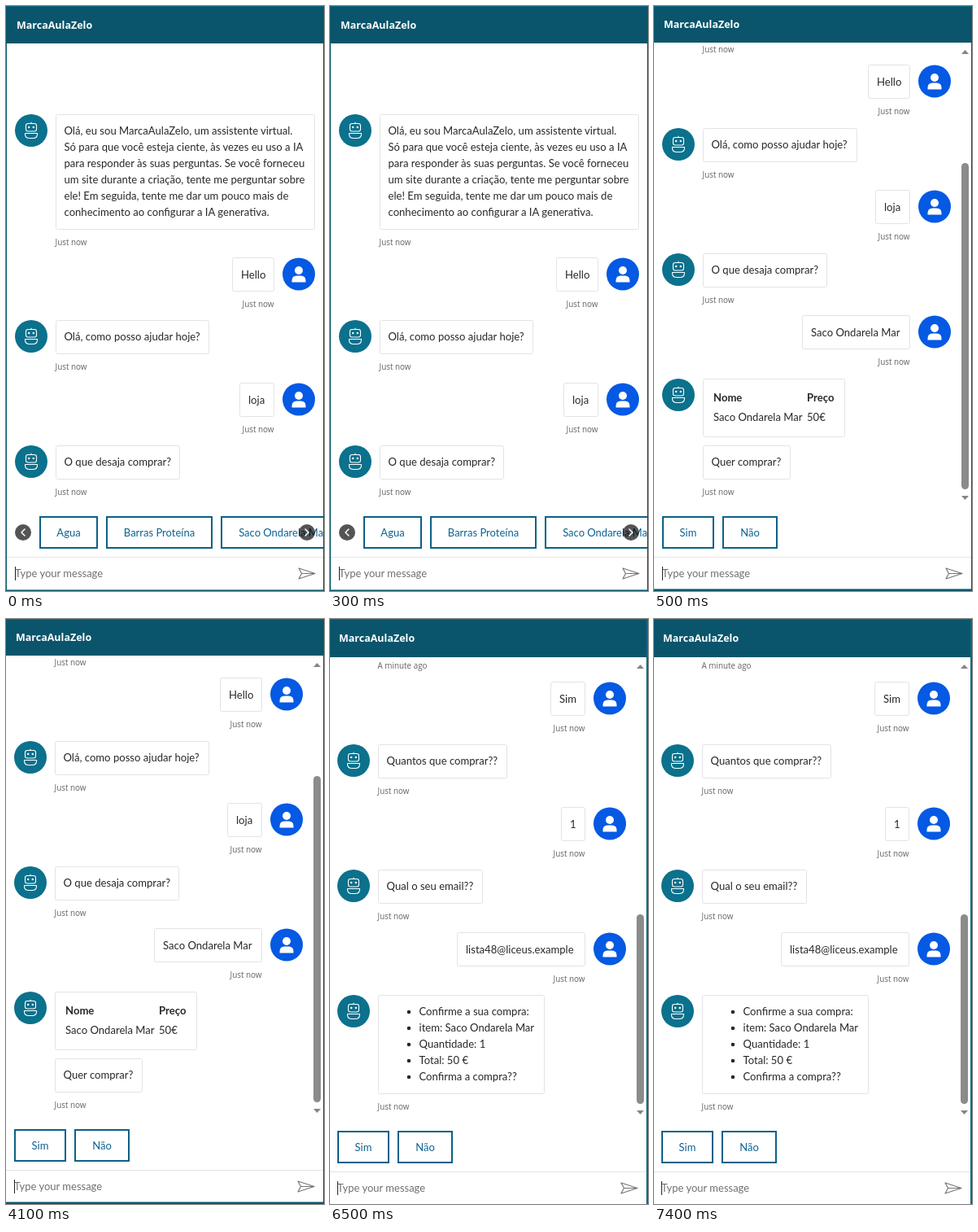
These frames come from a looping animation (391 px wide and 719 px high, 8000 ms). An HTML page:

```html
<!DOCTYPE html>
<html lang="pt">
<head>
<meta charset="utf-8">
<title>Chat</title>
<style>
  html, body { margin: 0; width: 100%; height: 100%; overflow: hidden; background: #fff; }
  svg { display: block; width: 391px; height: 719px; }
  text { font: 13.1px Lato, sans-serif; fill: #282828; white-space: pre; }
  .title { font: 700 12.5px "Open Sans", sans-serif; fill: #fff; }
  .time { font: 9.9px "Open Sans", sans-serif; fill: #636363; }
  .bold { font-weight: 700; }
  .chip { font-size: 13px; fill: #0b6191; text-anchor: middle; }
  .hint { font-size: 13px; fill: #707070; }
  .end { text-anchor: end; }
</style>
</head>
<body>
<svg id="stage" viewBox="0 0 391 719"></svg>
<script>
const NS = 'http://www.w3.org/2000/svg';
const stage = document.getElementById('stage');
const TEAL = '#0a556b';
const ITEM = 'Saco Ondarela Mar';
let layer;

function add(tag, attrs, content) {
  const el = document.createElementNS(NS, tag);
  for (const key in attrs) el.setAttribute(key, attrs[key]);
  if (content) el.textContent = content;
  layer.appendChild(el);
}
const rect = (x, y, width, height, fill, rx = 0) => add('rect', { x, y, width, height, fill, rx });
const circle = (cx, cy, r, fill) => add('circle', { cx, cy, r, fill });
const line = (d, stroke, width = 1, fill = 'none') => add('path', {
  d, stroke, fill, 'stroke-width': width, 'stroke-linecap': 'round', 'stroke-linejoin': 'round'
});
const text = (x, y, content, cls = '') => add('text', { x, y, class: cls }, content);

function bubble(x, y, right, height = 42) {
  add('rect', {
    x: x + 0.5, y: y + 0.5, width: right - x - 1, height: height - 1,
    rx: 2, fill: '#fff', stroke: '#e3e3e3'
  });
}

function botFace(x, y) {
  circle(x, y, 20, '#0b718c');
  line(`M${x - 4} ${y - 8.5}h8q2.5 0 2.5 2.5v4.5q0 2.5-2.5 2.5h-8q-2.5 0-2.5-2.5v-4.5q0-2.5 2.5-2.5z` +
    `M${x} ${y - 8.5}v-1.5M${x - 7.5} ${y + 3.5}h15v1q0 5-5.5 5h-4q-5.5 0-5.5-5z`, '#fff', 1.1);
  circle(x - 2.8, y - 4, 1.2, '#fff');
  circle(x + 2.8, y - 4, 1.2, '#fff');
}

function userFace(x, y) {
  circle(x, y, 20, '#0559e3');
  circle(x, y - 4.5, 5, '#fff');
  add('path', { d: `M${x - 8.5} ${y + 10}v-2q0-6 6-6h5q6 0 6 6v2z`, fill: '#fff' });
}

// One message from the bot; y is the top of the bubble.
function bot(x, y, right, lines, height = 42) {
  botFace(x - 30, y + 20);
  bubble(x, y, right, height);
  lines.forEach((s, i) => text(x + 10.5, y + 25 + 20 * i, s));
  text(x - 0.5, y + height + 19, 'Just now', 'time');
}

function user(x, y, right, content) {
  userFace(right + 30, y + 20.5);
  bubble(x, y, right);
  text(x + 11, y + 25.5, content);
  text(right - 0.5, y + 61, 'Just now', 'time end');
}

function chip(x, y, right, label) {
  add('rect', {
    x: x + 1, y: y + 1, width: right - x - 2, height: 38,
    fill: '#fff', stroke: '#0b6187', 'stroke-width': 2
  });
  text((x + right) / 2, y + 25, label, 'chip');
}

function arrow(x, y, dir) {
  circle(x, y, 10, 'rgba(0, 0, 0, 0.67)');
  line(`M${x - 2 * dir} ${y - 4}l${4 * dir} 4l${-4 * dir} 4`, '#fff', 1.5);
}

function scrollbar(x, top, thumb, bottom) {
  const mark = (y, h) => add('path', { d: `M${x - 4.5} ${y}h9l-4.5 ${h}z`, fill: '#858585' });
  mark(top + 5, -5);
  mark(bottom, 5);
  rect(x - 4.5, thumb, 9, bottom - 8 - thumb, '#8b8b8b', 4.5);
}

function header(height, x, base) {
  rect(0, 0, 391, height, TEAL);
  rect(0, 0, 391, 1, '#0d6a82');
  text(x, base, 'MarcaAulaZelo', 'title');
}

function inputBar(x, y) {
  rect(0, y, 391, 1, '#e4e4e4');
  text(x, y + 25, 'Type your message', 'hint');
  rect(x, y + 12, 1, 17, '#222');
  const px = x + 349, py = y + 20.5;
  line(`M${px} ${py - 6.5}l20 6.5l-20 6.5l3.5-6.5zM${px + 3.5} ${py}h16`, '#767676', 1.2);
}

function shop() {
  header(46, 13, 28);
  bot(61, 133, 380, [
    'Olá, eu sou MarcaAulaZelo, um assistente virtual.',
    'Só para que você esteja ciente, às vezes eu uso a IA',
    'para responder às suas perguntas. Se você forneceu',
    'um site durante a criação, tente me perguntar sobre',
    'ele! Em seguida, tente me dar um pouco mais de',
    'conhecimento ao configurar a IA generativa.'
  ], 142);
  user(278, 309, 330, 'Hello');
  bot(61, 386, 250, ['Olá, como posso ajudar hoje?']);
  user(287, 463, 330, 'loja');
  bot(61, 540, 214, ['O que desaja comprar?']);
  chip(41, 627, 113, 'Agua');
  chip(123, 627, 254, 'Barras Proteína');
  chip(264, 627, 417, ITEM);
  arrow(21, 647, -1);
  arrow(370, 647, 1);
  inputBar(11, 677);
  rect(0, 0, 1, 719, TEAL);
  rect(390, 0, 1, 719, TEAL);
  rect(0, 717.5, 391, 1.5, TEAL);
}

function price() {
  header(45, 12, 27);
  text(59.5, 57, 'Just now', 'time');
  user(263, 72, 315, 'Hello');
  bot(60, 150, 250, ['Olá, como posso ajudar hoje?']);
  user(272, 226, 315, 'loja');
  bot(60, 304, 213, ['O que desaja comprar?']);
  user(182, 380, 315, ITEM);
  botFace(30, 478);
  bubble(60, 458, 235, 72);
  text(73, 486, 'Nome', 'bold');
  text(188, 486, 'Preço', 'bold');
  text(73, 510, ITEM);
  text(188, 510, '50€');
  bubble(60, 540, 168);
  text(70.5, 565, 'Quer comprar?');
  text(59.5, 601, 'Just now', 'time');
  scrollbar(382.5, 54, 193, 602);
  chip(10, 627, 74, 'Sim');
  chip(84, 627, 152, 'Não');
  inputBar(10, 677);
  rect(390, 0, 1, 719, TEAL);
  rect(0, 716.5, 391, 2.5, TEAL);
}

function confirmOrder() {
  header(47, 11, 28);
  text(58.5, 61, 'A minute ago', 'time');
  user(271, 77, 314, 'Sim');
  bot(59, 154, 218, ['Quantos que comprar??']);
  user(284, 231, 314, '1');
  bot(59, 308, 188, ['Qual o seu email??']);
  user(156, 385, 314, 'lista48@liceus.example');
  bot(59, 462, 264, [], 122);
  ['Confirme a sua compra:', 'item: ' + ITEM, 'Quantidade: 1', 'Total: 50 €', 'Confirma a compra??']
    .forEach((s, i) => {
      circle(97, 483 + 20 * i, 2.3, '#282828');
      text(109.5, 487 + 20 * i, s);
    });
  scrollbar(381.5, 56, 363, 604);
  chip(9, 629, 73, 'Sim');
  chip(83, 629, 151, 'Não');
  inputBar(9, 679);
  rect(389, 0, 2, 719, '#0d6a82');
}

const scenes = [shop, price, confirmOrder].map(draw => {
  const group = document.createElementNS(NS, 'g');
  stage.appendChild(group);
  layer = group;
  draw();
  return group;
});

const start = performance.now();
function tick() {
  const t = (performance.now() - start) % 8000;
  const current = t < 500 ? 0 : t < 6500 ? 1 : 2;
  scenes.forEach((g, i) => g.style.display = i === current ? '' : 'none');
  requestAnimationFrame(tick);
}
tick();
</script>
</body>
</html>
```
